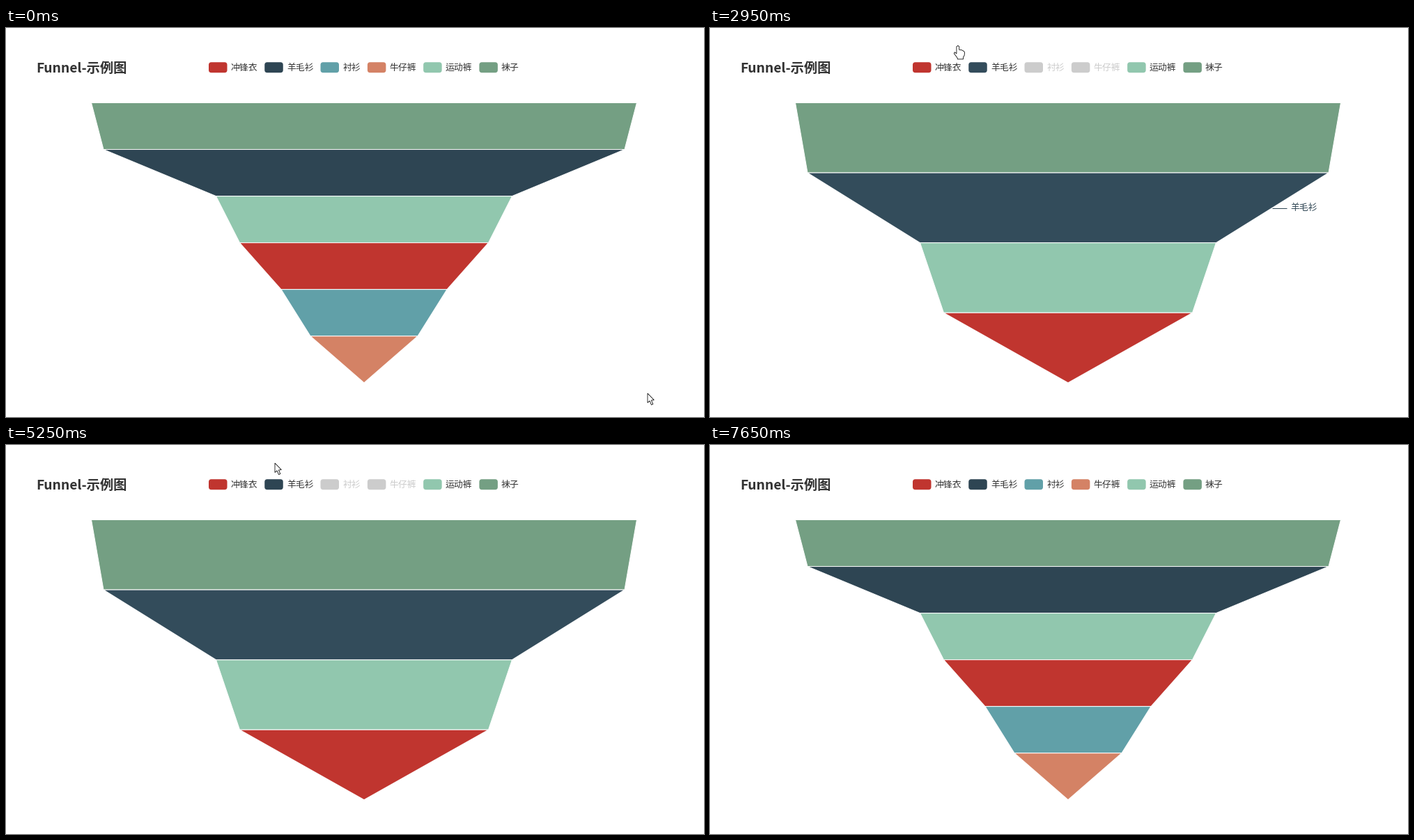
These frames come from a looping animation (1002 by 559 pixels, 8 s). A matplotlib script:

```python
import numpy as np
import matplotlib.pyplot as plt
from matplotlib.animation import FuncAnimation
from matplotlib.colors import to_rgb
from matplotlib.patches import FancyBboxPatch, Polygon
from matplotlib.path import Path

W, H, DPI = 1002, 559, 100
STEP, LOOP = 50, 8000
PX = 72 / DPI
FONT = "Noto Sans CJK JP"
INK, OFF = "#333333", "#cccccc"
CX, TOP, BOTTOM = 514, 107.5, 509.8

# name: colour, half width of the top edge (widest first)
BANDS = {
    "袜子": ("#749f83", 391.5),
    "羊毛衫": ("#2e4553", 374),
    "运动裤": ("#91c7ae", 212.5),
    "冲锋衣": ("#c0352f", 178.5),
    "衬衫": ("#61a0a8", 119),
    "牛仔裤": ("#d48265", 77),
}
LEGEND = ["冲锋衣", "羊毛衫", "衬衫", "牛仔裤", "运动裤", "袜子"]
EM, KEY_W, KEY_H, KEY_Y = 12.85, 26.5, 15, 49.2

# legend clicks: time, item
CLICKS = [(1250, "牛仔裤"), (2350, "衬衫"), (3350, "羊毛衫"),
          (4750, "羊毛衫"), (5750, "衬衫"), (6700, "牛仔裤")]
MORPH, LEAD = 300, 27

# pointer glides: start, end, tip reached
START = (921, 525)
GLIDES = [(0, 800, (485, 30)), (800, 1000, (471, 27)),
          (1800, 2200, (400, 24)), (2800, 3050, (332, 26)),
          (5000, 5250, (386, 26)), (5250, 5700, (404, 27)),
          (6050, 6400, (464.5, 26)), (7450, 7600, (442, 9))]
GONE = 7650
HOT_SPOT = np.array([60, 30])  # from the drawn tip to the point it acts on

ARROW = np.array([(0, 0), (0, 13.5), (3, 10.8), (5.5, 16.5), (7.8, 15.5),
                  (5.4, 10), (9.3, 9.6)])
HAND = np.array([(-2, 1.5), (0, 0), (1.8, 1.5), (1.8, 6), (4.5, 6), (7, 7.2),
                 (9, 8.6), (9.5, 10), (9.2, 14), (7.5, 17), (7.5, 19.5),
                 (-.5, 19.5), (-1, 17.5), (-5.5, 11.5), (-4.8, 9.4),
                 (-2, 11.5)])


def lift(color):
    return tuple(min(1, c * 1.1) for c in to_rgb(color))


def layout(shown):
    names = [n for n in BANDS if n in shown]
    halves = [BANDS[n][1] for n in names] + [0]
    ys = np.linspace(TOP, BOTTOM, len(names) + 1)
    return {n: np.array([(CX - halves[i], ys[i]), (CX + halves[i], ys[i]),
                         (CX + halves[i + 1], ys[i + 1]),
                         (CX - halves[i + 1], ys[i + 1])])
            for i, n in enumerate(names)}


def funnel(t):
    """Corners of each shown band, the item fading in and the progress."""
    shown, before, p = set(BANDS), set(BANDS), 1
    for start, name in CLICKS:
        if t >= start:
            before, shown = shown, shown ^ {name}
            left = 1 - min(1, (t - start + LEAD) / MORPH)
            p = 1 - left ** 3
    old, new = layout(before), layout(shown)
    fresh = next((n for n in new if n not in old), None)
    for n in new:
        if n in old:
            new[n] = old[n] + (new[n] - old[n]) * p
    return new, fresh, p


def pointer(t):
    pos = np.array(START, float)
    for a, b, goal in GLIDES:
        u = np.clip((t - a) / (b - a), 0, 1)
        pos += (np.array(goal) - pos) * u * u * (3 - 2 * u)
    return pos


def item_width(name):
    return KEY_W + 5.2 + EM * len(name)


KEY_X, x = {}, 291
for name in LEGEND:
    KEY_X[name] = x
    x += item_width(name) + 10


def hit(t):
    """Item under the pointer, and whether it is a legend entry."""
    x, y = pointer(t) + HOT_SPOT
    for name in LEGEND:
        if abs(y - KEY_Y - KEY_H / 2) < 9 and 0 < x - KEY_X[name] < item_width(name):
            return name, True
    for name, corners in funnel(t)[0].items():
        if Path(corners).contains_point((x, y)):
            return name, False
    return None, False


fig = plt.figure(figsize=(W / DPI, H / DPI), dpi=DPI, facecolor="white")
ax = fig.add_axes([0, 0, 1, 1])
ax.set_xlim(0, W)
ax.set_ylim(H, 0)
ax.axis("off")


def label(x, y, s, size=EM, **kw):
    return ax.text(x, y, s, size=size * PX, color=INK, family=FONT,
                   va="baseline", **kw)


label(43.5, 63.8, "Funnel-示例图", 19.3, weight="bold")

keys, key_texts = {}, {}
for name, x in KEY_X.items():
    keys[name] = ax.add_patch(FancyBboxPatch(
        (x, KEY_Y), KEY_W, KEY_H, boxstyle="round,pad=0,rounding_size=3.8",
        lw=0))
    key_texts[name] = label(x + KEY_W + 5.2, 60.5, name)

shapes = {n: ax.add_patch(Polygon(np.zeros((4, 2)), ec="white", lw=PX,
                                  joinstyle="miter"))
          for n in BANDS}
lead_line, = ax.plot([], [], lw=PX, solid_capstyle="butt", zorder=5)
lead_text = label(0, 0, "", zorder=5)
cursor = ax.add_patch(Polygon(ARROW, fc="white", ec="black", lw=.8 * PX,
                              zorder=9))


def draw(i):
    t = i * STEP
    corners, fresh, p = funnel(t)
    hot, on_key = hit(t - STEP)
    # items that were switched off and on again have lost their label
    touched = {n for start, n in CLICKS if start <= t}
    tagged = hot in corners and hot not in touched

    for name, (color, _) in BANDS.items():
        on = name in corners
        shape = shapes[name]
        shape.set_visible(on)
        if on:
            shape.set_xy(corners[name])
            shape.set_facecolor(lift(color) if name == hot else color)
            shape.set_alpha(p if name == fresh else 1)
            shape.set_zorder(3 if name == fresh else 2)
        lit = name == hot and tagged and on_key
        keys[name].set_facecolor(OFF if not on else lift(color) if lit else color)
        key_texts[name].set_color(INK if on else OFF)

    lead_line.set_visible(tagged)
    lead_text.set_visible(tagged)
    if tagged:
        color = BANDS[hot][0]
        ex, ey = corners[hot][1:3].mean(axis=0)
        ey = np.floor(ey) + .5
        lead_line.set_data([ex, ex + 21], [ey, ey])
        lead_line.set_color(color)
        lead_text.set_text(hot)
        lead_text.set_color(color)
        lead_text.set_position((ex + 26, ey + 3.8))

    cursor.set_visible(t < GONE)
    cursor.set_xy((HAND if hit(t)[0] else ARROW) + pointer(t))
    return []


anim = FuncAnimation(fig, draw, frames=LOOP // STEP, interval=STEP,
                     repeat=True, repeat_delay=0, blit=False)
plt.show()
```
